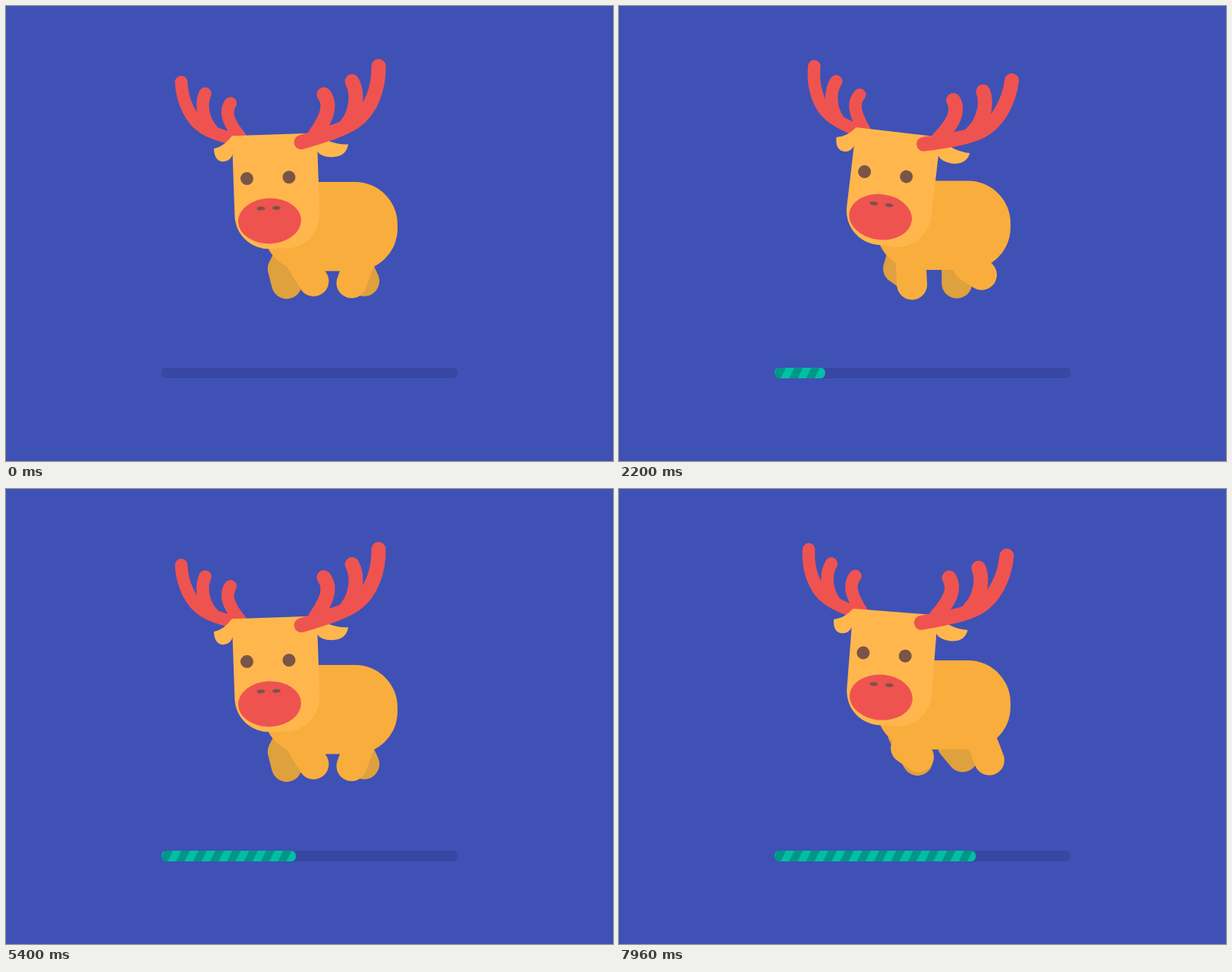
An HTML page for the animation above (8000 ms loop, 800x600 px).

```html
<!DOCTYPE html>
<html lang="en">
<head>
<meta charset="utf-8">
<title>Reindeer loader</title>
<style>
  html, body { margin: 0; width: 100%; height: 100%; overflow: hidden; background: #3f51b5; }
  svg { display: block; width: 100vw; height: 100vh; }
  .leg { fill: none; stroke-width: 40; stroke-linecap: round; stroke-linejoin: round; }
  .near { stroke: #f9ad3c; }
  .far { stroke: #dfa03e; }
  .antler { fill: none; stroke: #ef5350; stroke-width: 19; stroke-linecap: round; stroke-linejoin: round; }
  .antler path { vector-effect: non-scaling-stroke; }
</style>
</head>
<body>
<svg viewBox="0 0 800 600">
  <defs>
    <path id="horn" d="M392 181C430 171 450 165 464 156C486 142 497 112 497.4 84.2
      M411 171C427 150 434 133 424 119M453 159C464 147 471 122 461.7 103"/>
    <pattern id="stripes" width="22.36" height="14" x="213" y="477" patternUnits="userSpaceOnUse">
      <rect width="22.36" height="14" fill="#009688"/>
      <path d="M7 0H18.18L11.18 14H0Z" fill="#00bfa5"/>
    </pattern>
    <clipPath id="track"><rect x="205" y="477" width="390" height="14" rx="6"/></clipPath>
    <clipPath id="filled"><rect id="fill" x="-185" y="477" width="390" height="14" rx="6"/></clipPath>
  </defs>

  <rect x="205" y="477" width="390" height="14" rx="6" fill="#3747a2"/>
  <g clip-path="url(#track)">
    <rect x="205" y="477" width="390" height="14" fill="url(#stripes)" clip-path="url(#filled)"/>
  </g>

  <g id="deer">
    <g id="farLegs"></g>
    <rect x="339" y="232" width="177" height="117.5" rx="56" fill="#f9ad3c"/>
    <g id="nearLegs"></g>
    <g id="head">
      <g class="antler" transform="translate(669.4 22.8) scale(-.87 .87)"><use href="#horn"/></g>
      <g fill="#ffb74d">
        <path d="M301 169.5Q291 183 276.6 185.6Q277 203 289 203Q298 203 302 192Z"/>
        <path d="M412 170Q430 186 453.8 185.8Q451 202 432 202Q418 202 412 193Z"/>
        <path d="M301 169.5H413V275a45 45 0 0 1-45 45H346a45 45 0 0 1-45-45Z"/>
      </g>
      <ellipse cx="346.8" cy="283.2" rx="41.5" ry="30" fill="#ef5350"/>
      <g fill="#795548">
        <circle cx="318.8" cy="226.4" r="8.5"/>
        <circle cx="374.3" cy="226.4" r="8.5"/>
        <ellipse cx="335.9" cy="266.4" rx="5.5" ry="2.5"/>
        <ellipse cx="356.4" cy="266.4" rx="5.5" ry="2.5"/>
      </g>
      <g class="antler"><use href="#horn"/></g>
    </g>
  </g>
</svg>
<script>
  const LOOP = 8000, STRIDE = 600, STEP = 40;
  const THIGH = 20, SHIN = 20.5;
  const $ = id => document.getElementById(id);

  // Swings are [mean, cosine, sine] in degrees from straight down.
  const legs = [
    { side: 'far', hip: [374, 328.5], thigh: [-3.5, -23.5, 29.2], shin: [36.3, -22.3, -8.7] },
    { side: 'far', hip: [452, 327.8], thigh: [-13, 48, -19.9], shin: [20.2, 4.8, 20.5] },
    { side: 'near', hip: [384, 328.5], thigh: [2.9, 29.1, -16.9], shin: [28.4, 3.6, 27.2] },
    { side: 'near', hip: [470, 327.5], thigh: [-5.3, -16.7, 35.8], shin: [26.2, -46.2, -10] }
  ];

  for (const leg of legs) {
    leg.path = document.createElementNS('http://www.w3.org/2000/svg', 'path');
    leg.path.setAttribute('class', 'leg ' + leg.side);
    $(leg.side + 'Legs').append(leg.path);
  }

  const swing = ([mean, c, s], phase) => mean + c * Math.cos(phase) + s * Math.sin(phase);

  function bone([x, y], length, degrees) {
    const a = degrees * Math.PI / 180;
    return [x + length * Math.sin(a), y + length * Math.cos(a)];
  }

  function draw(time) {
    const phase = time % STRIDE / STRIDE * 2 * Math.PI;

    const lift = swing([-2.73, 2.73, -3], phase);
    $('deer').setAttribute('transform', `translate(0 ${lift})`);

    const nod = swing([3.84, -5.84, 0], phase);
    $('head').setAttribute('transform', `translate(0 -.6) rotate(${nod} 370 264)`);

    for (const { path, hip, thigh, shin } of legs) {
      const knee = bone(hip, THIGH, swing(thigh, phase));
      const foot = bone(knee, SHIN, swing(shin, phase));
      path.setAttribute('d', `M${hip}L${knee}L${foot}`);
    }

    const progress = Math.max(0, (time - 260) * 0.03443);
    $('fill').setAttribute('x', progress - 185);
  }

  function tick() {
    const time = performance.now() % LOOP;
    draw(Math.floor(time / STEP) * STEP);
    requestAnimationFrame(tick);
  }
  tick();
</script>
</body>
</html>
```
